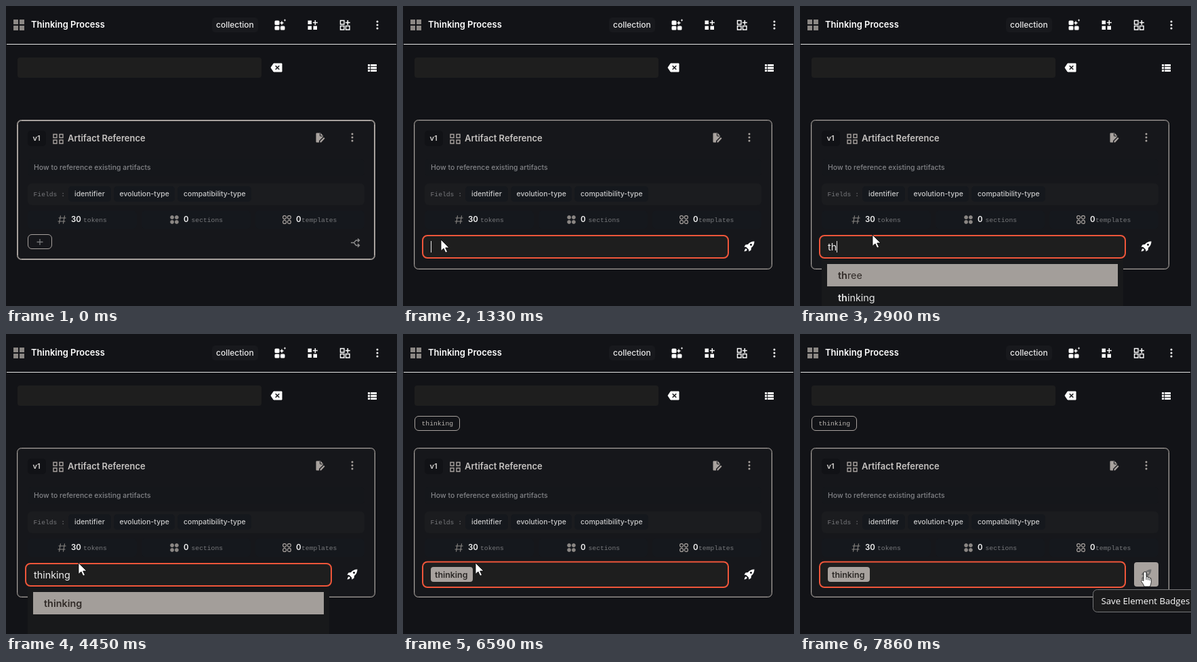
An HTML page for the animation above (8 s loop, 577 px wide and 443 px high).

```html
<!DOCTYPE html>
<html lang="en">
<head>
<meta charset="utf-8">
<title>Tagging a card</title>
<style>
  html, body { margin: 0; width: 100%; height: 100%; overflow: hidden; background: #121317; }
  svg { display: block; font-family: Inter, sans-serif; }
  text { white-space: pre; }
  .mono { font: 9.7px "Liberation Mono", monospace; fill: #77787b; }
  .chip { font-size: 10.5px; font-weight: 500; fill: #c9c9ca; }
  .num { font-size: 11.5px; font-weight: 600; fill: #f2f2f2; }
  .title { font-size: 13px; font-weight: 600; }
  .entry { font-size: 14.4px; }
  .b { font-weight: 600; }
  .line { fill: none; stroke: #a8a29e; }
</style>
</head>
<body>
<svg width="577" height="443" viewBox="0 0 577 443">
  <defs>
    <g id="dots"><circle cy="-5" r="1.5"/><circle r="1.5"/><circle cy="5" r="1.5"/></g>
    <g id="four"><circle cx="-3.4" cy="-3.4" r="2.5"/><circle cx="3.4" cy="-3.4" r="2.5"/><circle cx="-3.4" cy="3.4" r="2.5"/><circle cx="3.4" cy="3.4" r="2.5"/></g>
    <path id="three" d="M-6.5-6.5h5.5v5.5h-5.5zM-6.5 1.5h5.5v5.5h-5.5zM1.5 1.5h5.5v5.5h-5.5z"/>
  </defs>

  <!-- header -->
  <path d="M11 20h7v7h-7zM20 20h7v7h-7zM11 29h7v7h-7zM20 29h7v7h-7z" fill="#8b8784"/>
  <text x="37" y="32" class="title" fill="#fff">Thinking Process</text>
  <rect x="304" y="17" width="68" height="22" rx="5" fill="#18191d"/>
  <text x="310" y="32" font-size="12" font-weight="500" fill="#e9e9e9">collection</text>
  <g fill="#fff">
    <rect x="396.5" y="21.5" width="7" height="6.5" rx="1.5"/>
    <rect x="396.5" y="29.5" width="7" height="6" rx="1.5"/>
    <rect x="405" y="29.5" width="6.5" height="6" rx="1.5"/>
    <path d="M407 21.5l1 2.5 2.5 1-2.5 1-1 2.5-1-2.5-2.5-1 2.5-1zM411.5 19l.6 1.4 1.4.6-1.4.6-.6 1.4-.6-1.4-1.4-.6 1.4-.6z"/>
    <use href="#three" x="452" y="28"/>
    <use href="#dots" x="548" y="28"/>
    <path d="M391 91l4-6h12v12h-12z" stroke="#fff" stroke-linejoin="round"/>
    <path d="M534 86h3v3h-3zM538 86h9v3h-9zM534 90h3v3h-3zM538 90h9v3h-9zM534 94h3v3h-3zM538 94h9v3h-9z"/>
  </g>
  <path d="M397.7 88.2l5.6 5.6M403.3 88.2l-5.6 5.6" stroke="#121317" stroke-width="1.5"/>
  <use href="#three" x="500" y="28" fill="none" stroke="#fff" stroke-width="1.4"/>
  <path d="M456.3 21v7M452.8 24.5h7M504.3 21v7M500.8 24.5h7" stroke="#fff" stroke-width="1.5"/>
  <path d="M1 56.5h575" stroke="#e4e4e4"/>
  <rect x="17" y="76" width="360" height="30" rx="4" fill="#1e1e1e"/>
  <g id="tag">
    <rect x="17.5" y="121.5" width="66" height="21" rx="5.5" class="line"/>
    <text x="27.5" y="135" class="mono" style="fill:#b9b4b0">thinking</text>
  </g>

  <!-- card -->
  <rect id="card" x="16.5" y="168.5" width="528" height="206" rx="6" fill="#16171b" stroke="#a8a29e"/>
  <rect id="ring" x="17.5" y="169.5" width="526" height="204" rx="5" class="line"/>
  <rect x="32" y="184" width="27" height="23" rx="5" fill="#111216"/>
  <text x="39.5" y="199" font-size="11" font-weight="600" fill="#d6d3d1">v1</text>
  <path d="M70 189.5h5v5h-5zM79 189.5h5v5h-5zM70 198h5v5h-5zM79 198h5v5h-5z" class="line" stroke-width="1.4"/>
  <text x="91" y="200" class="title" fill="#c6c3c1">Artifact Reference</text>
  <path d="M458.500 187.500h5.500l4 4v1.500l-6 6v2.500h-3.500q-1 0-1-1v-12q0-1 1-1z" fill="#a8a29e"/>
  <path d="M463.500 201.500v-2l5.500-5.500 1.500 1.500-5.500 6z" fill="#a8a29e"/>
  <path d="M463.500 188v4h4" fill="none" stroke="#16171b"/>
  <use href="#dots" x="511" y="194" fill="#a8a29e"/>
  <rect x="32" y="226" width="497" height="25" rx="5" fill="#15171b"/>
  <text x="41" y="242" class="chip" style="fill:#838488">How to reference existing artifacts</text>
  <rect x="32" y="262" width="497" height="32" rx="6" fill="#1b1c1f"/>
  <text x="40.500" y="281" class="mono">Fields :</text>
  <g fill="#15181d">
    <rect x="92" y="266" width="63" height="23" rx="5"/>
    <rect x="159" y="266" width="90" height="23" rx="5"/>
    <rect x="253" y="266" width="109" height="23" rx="5"/>
    <rect x="32" y="302" width="161" height="27" rx="5"/>
    <rect x="200" y="302" width="161" height="27" rx="5"/>
    <rect x="368" y="302" width="161" height="27" rx="5"/>
  </g>
  <g class="chip">
    <text x="101" y="281">identifier</text>
    <text x="167.500" y="281">evolution-type</text>
    <text x="262" y="281">compatibility-type</text>
  </g>
  <path d="M80.500 309.500l-2 12M86.500 309.500l-2 12M77.500 313h11M76.500 318h11" stroke="#8b8784" stroke-width="1.100"/>
  <use href="#four" x="248.500" y="315.500" fill="#8b8784" stroke="#8b8784" stroke-width=".8"/>
  <use href="#four" x="414.500" y="315.500" class="line" stroke-width="1.200"/>
  <g class="num">
    <text x="96" y="319">30</text><text x="262" y="319">0</text><text x="428" y="319">0</text>
  </g>
  <g class="mono">
    <text x="114" y="319">tokens</text><text x="273.500" y="319">sections</text><text x="436" y="319">templates</text>
  </g>

  <g id="actions">
    <rect x="32.500" y="337.500" width="35" height="21" rx="5.500" class="line"/>
    <path d="M45.500 348.500h9M50 344v9" stroke="#77787a" stroke-width="1.300"/>
    <path id="share" d="M509 349.500h4.500l3-3.500h5M513.500 349.500l3 4h5M519 343.500l2.500 2.500-2.500 2.500M519 351l2.500 2.500-2.500 2.500" fill="none" stroke-width="1.400"/>
  </g>

  <g id="editor">
    <rect id="menu" x="32" y="374" width="445" height="69" fill="#18191b"/>
    <rect id="box" x="29" width="451" rx="7" fill="#1e1e1e" stroke="#f0563a" stroke-width="2"/>
    <text id="typed" x="41" y="361" class="entry" fill="#f0f0f0"></text>
    <g id="badge">
      <rect x="41" y="344" width="62" height="22" rx="4" fill="#a8a29e"/>
      <text x="47" y="360" class="b" font-size="12.400" fill="#2b2826">thinking</text>
    </g>
    <rect id="caret" y="347" width="1" height="17" fill="#e8e8e8"/>
    <g id="list" class="entry">
      <rect x="40" y="381" width="429" height="33" fill="#a39e9a"/>
      <text x="56" y="403" fill="#302a27"><tspan id="hit1" class="b"></tspan><tspan id="rest1"></tspan></text>
      <text x="56" y="436" fill="#e8e8e8"><tspan id="hit2" class="b"></tspan><tspan id="rest2"></tspan></text>
    </g>
    <rect id="hover" x="493" y="337" width="36" height="36" rx="4" fill="#a8a29e"/>
    <g id="rocket" transform="translate(503.500 347.500)" fill="#fff">
      <path fill-rule="evenodd" d="M15 0Q9 0 5.500 4.500L2 5 0 8l3 .5L6.500 12 7 15l3-2 .5-3.500Q15 6 15 0zM10 3.500a1.500 1.500 0 1 0 .01 0z"/>
      <path d="M2.500 10.500Q.5 11.500 0 15q3.500-.5 4.500-2.500z"/>
    </g>
  </g>

  <g id="tip">
    <rect x="432.500" y="377.500" width="155" height="33" rx="6" fill="#1b1b1c" stroke="#77787a"/>
    <text x="444.500" y="399" font-size="13.200" fill="#fff" style="font-family:'Open Sans',sans-serif">Save Element Badges</text>
  </g>

  <g id="cursor" fill="#fff" stroke="#000" stroke-width=".8" stroke-linejoin="round">
    <path id="arrow" d="M0 0V16.500L4 13l2.800 6.200 2.700-1.200-2.800-6H12z"/>
    <g id="hand">
      <path d="M-2 2A2 2 0 0 1 2 2V7.500Q4 6.500 4.700 8.300 6.500 7.500 7.200 9.300 9.300 9 9.300 11v4.500Q9 18 7.500 22H-1Q-2 18.500-5.300 14.500-5.500 11-2 13.500z"/>
      <path d="M2 8v4M4.700 8.500v4M7.200 9.500v3.500" fill="none"/>
    </g>
  </g>
</svg>
<script>
const LOOP = 8000, STEP = 70, WORD = "thinking";
const keyTimes = [3110, 3250, 3460, 3670, 3810, 3950];
const caretOn = [[1330, 1830], [2330, 4450], [5020, 5520], [6020, 6590], [7090, 7590]];
// time, x, y of the pointer tip
const path = [
  [70, 165, 436], [280, 130, 380], [490, 88, 350], [630, 76, 346], [700, 76, 346],
  [910, 60, 344], [980, 60, 344], [1050, 56, 345], [1690, 56, 345], [1760, 88, 341],
  [1830, 107, 338], [7020, 107, 338], [7090, 130, 332], [7160, 200, 323], [7300, 380, 319],
  [7440, 490, 335], [7580, 507, 349], [7790, 509, 351], [LOOP, 509, 351]
];

const $ = id => document.getElementById(id);
const show = (id, on) => $(id).style.opacity = +on;
const set = (id, name, value) => $(id).setAttribute(name, value);
const ramp = (t, from, to) => Math.min(1, Math.max(0, (t - from) / (to - from)));
const mix = (a, b, p) => a + (b - a) * p;

function pointer(t) {
  const i = Math.max(1, path.findIndex(k => k[0] > t));
  const [t0, x0, y0] = path[i - 1], [t1, x1, y1] = path[i];
  const p = Math.floor((t - t0) / STEP) * STEP / (t1 - t0);
  return [mix(x0, x1, p), mix(y0, y1, p)];
}

function option(row, word, hit) {
  $("hit" + row).textContent = word.slice(0, hit);
  $("rest" + row).textContent = word.slice(hit);
}

function draw(t) {
  const tagged = t >= 4810, typing = t >= 2900 && !tagged;
  const open = t < 1190 ? 0 : ramp(t + STEP, 1190, 1330);
  const fade = ramp(t, 70, 490);

  const height = mix(206, 220, open);
  set("card", "height", height);
  set("ring", "height", height - 2);
  show("ring", mix(1, .25, fade));
  const gray = mix(142, 88, fade);
  set("share", "stroke", `rgb(${gray},${gray},${gray})`);
  show("actions", open === 0);
  show("editor", open);
  show("tag", tagged);
  show("badge", tagged);
  set("box", "y", tagged ? 336.5 : 339);
  set("box", "height", tagged ? 37.5 : 33);

  show("menu", typing);
  show("list", typing);
  const count = typing ? 2 + keyTimes.filter(k => t >= k).length : 0;
  const typed = WORD.slice(0, count);
  $("typed").textContent = typed;
  if (count === 2) {
    option(1, "three", 2);
    option(2, WORD, 2);
  } else {
    option(1, WORD, count);
    option(2, typed === WORD ? "" : typed, count);
  }

  set("caret", "x", tagged ? 107 : 41 + Math.floor(count && $("typed").getComputedTextLength()));
  show("caret", caretOn.some(([a, b]) => t >= a && t < b));

  const lit = ramp(t, 7440, 7720), shade = mix(255, 112, lit);
  show("hover", lit);
  set("rocket", "fill", `rgb(${shade},${shade},${shade})`);
  show("tip", ramp(t, 7720, 7860));

  const [x, y] = pointer(t);
  const hand = t >= 840 && t < 1190 || t >= 7440;
  set("cursor", "transform", `translate(${x} ${y})`);
  show("cursor", t >= 70);
  show("hand", hand);
  show("arrow", !hand);
}

const start = performance.now();
function tick() {
  draw((performance.now() - start) % LOOP);
  requestAnimationFrame(tick);
}
tick();
</script>
</body>
</html>
```
